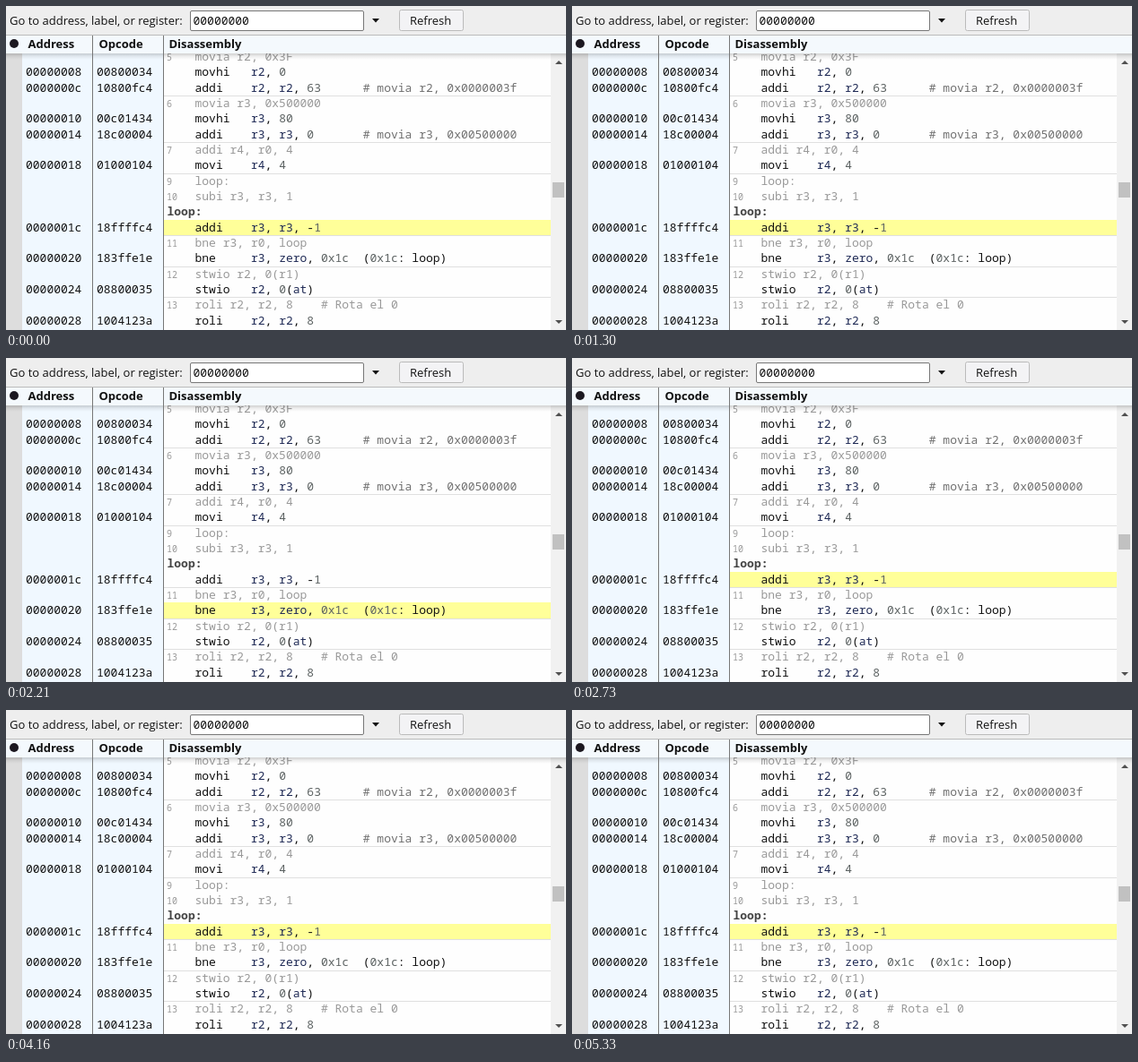
These frames come from a looping animation (624 by 362 pixels, 5.46 s). An HTML page:

```html
<!DOCTYPE html>
<html lang="en">
<head>
<meta charset="utf-8">
<title>Disassembly</title>
<style>
html, body { margin: 0; width: 100%; height: 100%; overflow: hidden; background: #fff; }
svg { display: block; width: 624px; height: 362px; }
text { white-space: pre; }
.ui { font: 13px "Open Sans", sans-serif; fill: #111; }
.head { font: bold 13px "Open Sans", sans-serif; fill: #111; }
.code { font: 13px "Noto Sans Mono", monospace; fill: #111; }
.note { font: 13px "Noto Sans Mono", monospace; fill: #999; }
.num { font: 10px "Noto Sans Mono", monospace; fill: #999; }
.label { font: bold 13px "Noto Sans Mono", monospace; fill: #444; }
.reg { fill: #1f2a55; }
.imm { fill: #5c6262; }
.rem { fill: #707070; }
</style>
</head>
<body>
<svg viewBox="0 0 624 362">
  <defs>
    <linearGradient id="shade" x2="0" y2="1">
      <stop offset="0" stop-color="#000" stop-opacity=".18"/>
      <stop offset=".5" stop-color="#000" stop-opacity=".06"/>
      <stop offset="1" stop-color="#000" stop-opacity="0"/>
    </linearGradient>
  </defs>
  <rect width="624" height="362" fill="#fefefe"/>
  <rect y="53" width="18" height="309" fill="#ddd"/>
  <rect x="18" y="53" width="157" height="309" fill="#f0f8ff"/>
  <rect id="mark" x="175" width="432" fill="#ffff99"/>
  <g id="rows"></g>

  <rect x="607" y="53" width="17" height="309" fill="#f1f1f1"/>
  <rect x="609" y="197" width="13" height="17" fill="#c1c1c1"/>
  <path d="M612 65h8l-4-4zM612 351h8l-4 4z" fill="#505050"/>

  <rect y="33" width="624" height="20" fill="#f4f9fd"/>
  <rect y="53" width="624" height="7" fill="url(#shade)"/>
  <path d="M96.5 33V362M175.5 33V362" stroke="#777"/>
  <circle cx="9" cy="42" r="5" fill="#1c1820"/>
  <text class="head" x="24.5" y="47">Address</text>
  <text class="head" x="103.5" y="47">Opcode</text>
  <text class="head" x="181.5" y="47">Disassembly</text>

  <rect width="624" height="32" fill="#eee"/>
  <path d="M0 32.5H624" stroke="#bbb"/>
  <text class="ui" x="4" y="21">Go to address, label, or register:</text>
  <rect x="205.5" y="5.5" width="193" height="22" rx="1.5" fill="#fff" stroke="#777"/>
  <text class="code" x="208.5" y="21">00000000</text>
  <path d="M408 14h8l-4 4.5z" fill="#111"/>
  <rect x="438.5" y="4.5" width="71" height="23" rx="2" fill="#f3f3f5" stroke="#bbb"/>
  <text class="ui" x="450" y="21">Refresh</text>
</svg>
<script>
const PITCH = 17.33, TOP = 48, LOOP = 5460;
const rows = document.getElementById("rows");
const mark = document.getElementById("mark");

// Line number + source text, address + opcode + instruction, or a label.
const listing = [
  ["5", "movia r2, 0x3F"],
  ["00000008", "00800034", "movhi   r2, 0"],
  ["0000000c", "10800fc4", "addi    r2, r2, 63      # movia r2, 0x0000003f"],
  ["6", "movia r3, 0x500000"],
  ["00000010", "00c01434", "movhi   r3, 80"],
  ["00000014", "18c00004", "addi    r3, r3, 0       # movia r3, 0x00500000"],
  ["7", "addi r4, r0, 4"],
  ["00000018", "01000104", "movi    r4, 4"],
  ["9", "loop:"],
  ["10", "subi r3, r3, 1"],
  ["loop:"],
  ["0000001c", "18ffffc4", "addi    r3, r3, -1"],
  ["11", "bne r3, r0, loop"],
  ["00000020", "183ffe1e", "bne     r3, zero, 0x1c  (0x1c: loop)"],
  ["12", "stwio r2, 0(r1)"],
  ["00000024", "08800035", "stwio   r2, 0(at)"],
  ["13", "roli r2, r2, 8    # Rota el 0"],
  ["00000028", "1004123a", "roli    r2, r2, 8"]
];

const rowTop = k => Math.round(TOP + k * PITCH);

const tint = s => s.replace(/#.*|\b(?:r\d|zero|at)\b|\b0x1c\b|\b\d+\b/g, m => {
  const kind = m[0] === "#" ? "rem" : /^\d/.test(m) ? "imm" : "reg";
  return `<tspan class="${kind}">${m}</tspan>`;
});

const put = (kind, x, y, s) => `<text class="${kind}" x="${x}" y="${y}">${s}</text>`;

rows.innerHTML = listing.map((row, k) => {
  const top = rowTop(k), y = top + 13;
  if (row.length === 1) return put("label", 179.5, y, row[0]);
  if (row.length === 3)
    return put("code", 22, y, row[0]) + put("code", 101, y, row[1]) + put("code", 210.5, y, tint(row[2]));
  const rule = row[0] === "10" ? "" : `<path d="M175 ${top + 0.5}H607" stroke="#e0e0e0"/>`;
  return rule + put("num", 179, y, row[0]) + put("note", 210.5, y, row[1]);
}).join("");

// The branch is highlighted for 650 ms in every 2600 ms, otherwise the decrement.
function draw(t) {
  const branch = t >= 1820 && (t - 1820) % 2600 < 650;
  const k = branch ? 13 : 11;
  mark.setAttribute("y", rowTop(k));
  mark.setAttribute("height", rowTop(k + 1) - rowTop(k));
}

function tick() {
  draw(performance.now() % LOOP);
  requestAnimationFrame(tick);
}
tick();
</script>
</body>
</html>
```
